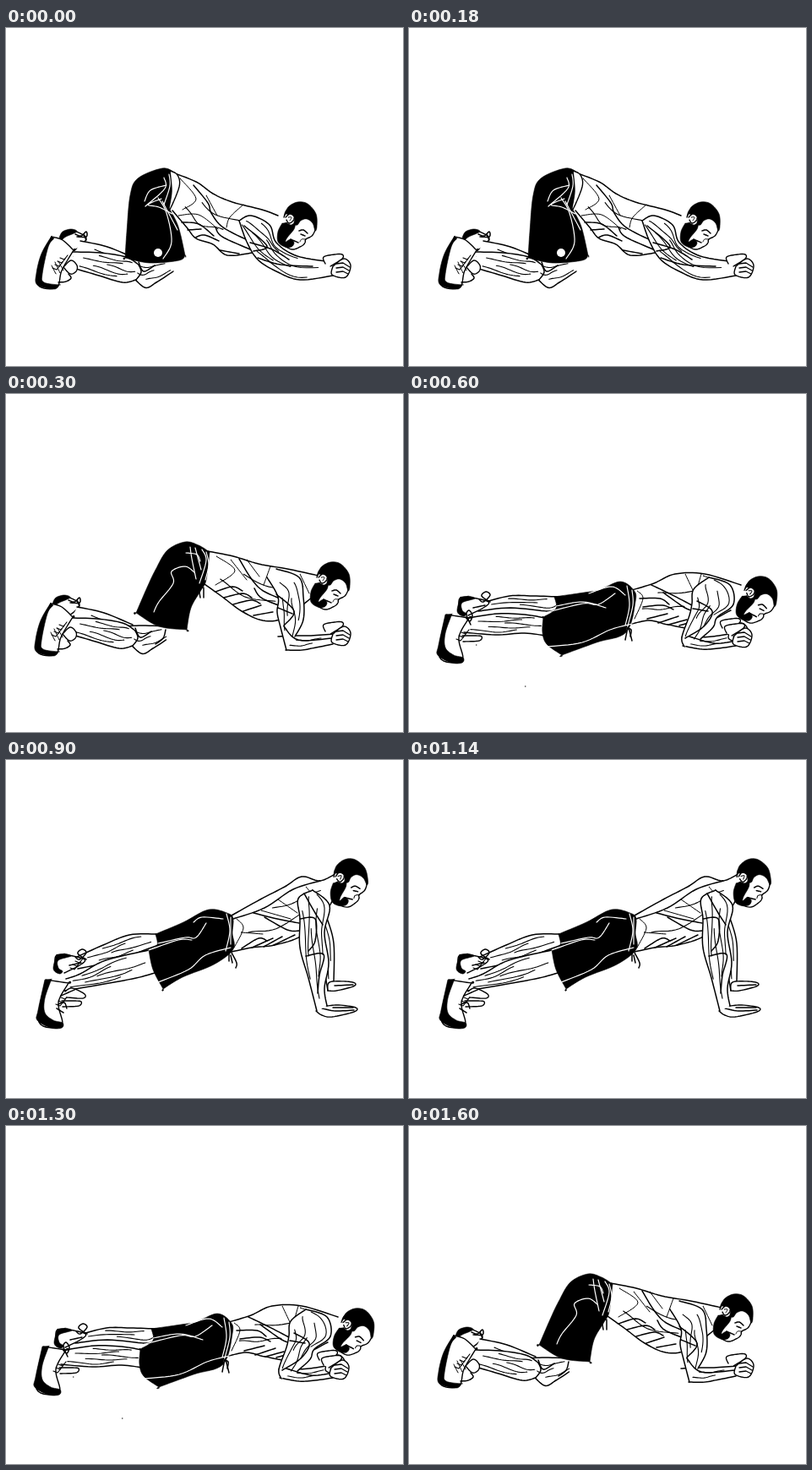
Write an HTML page with a canvas that moves like this. It is 470 by 400 pixels and loops after 1900 ms.

```html
<!DOCTYPE html>
<html lang="en">
<head>
<meta charset="utf-8">
<title>Plank push-up</title>
<style>
html, body { margin: 0; width: 100%; height: 100%; overflow: hidden; background: #fff; }
canvas { display: block; }
</style>
</head>
<body>
<canvas id="stage" width="470" height="400"></canvas>
<script>
const ctx = document.getElementById("stage").getContext("2d");
ctx.lineCap = ctx.lineJoin = "round";

const points = text => text.split(" ").map(q => q.split(",").map(Number));

// Position on the smooth curve through p, with u from 0 to 1
function spot(p, u) {
  const k = u * (p.length - 1), i = Math.min(Math.floor(k), p.length - 2), t = k - i;
  const b = p[i], c = p[i + 1], a = p[i - 1] || b, e = p[i + 2] || c;
  return b.map((v, j) => v + t / 2 * (c[j] - a[j]
    + t * (2 * a[j] - 5 * v + 4 * c[j] - e[j] + t * (3 * v - a[j] - 3 * c[j] + e[j]))));
}

function sample(p) {
  const n = (p.length - 1) * 8;
  return Array.from({ length: n + 1 }, (_, i) => spot(p, i / n));
}

function paint(list, stroke, width, fill) {
  ctx.beginPath();
  list.forEach(q => ctx.lineTo(...q));
  if (fill) { ctx.fillStyle = fill; ctx.fill(); }
  ctx.strokeStyle = stroke;
  ctx.lineWidth = width;
  ctx.stroke();
}

const strokes = (text, colour, width) =>
  text.split(" | ").forEach(s => paint(sample(points(s)), colour, width));
const line = text => strokes(text, "#000", 1.5);
const thin = text => strokes(text, "#000", 1);
const chalk = text => strokes(text, "#fff", 1.2);
const shape = text => paint(sample(points(text)), "#000", 1.4, "#fff");
const ink = text => paint(sample(points(text)), "#000", .6, "#000");

// White body part between two contours, with n staggered muscle lines
function muscle(top, bottom, n) {
  const a = points(top), b = points(bottom);
  const up = sample(a), down = sample(b);
  paint([...up, ...[...down].reverse()], "transparent", 1, "#fff");
  paint(up, "#000", 1.5);
  paint(down, "#000", 1.5);
  for (let i = 1; i <= n; i++) {
    const from = .04 + .45 * (i * .62 % 1);
    const fibre = Array.from({ length: 17 }, (_, k) => {
      const u = from + k / 16 * .48, f = i / (n + 1) + .05 * Math.sin(u * 11 + i * 2);
      const q = spot(b, u);
      return spot(a, u).map((v, j) => v + (q[j] - v) * f);
    });
    paint(fibre, "#000", 1.1);
  }
}

function placed(x, y, angle, part) {
  ctx.save();
  ctx.translate(x, y);
  ctx.rotate(angle * Math.PI / 180);
  part();
  ctx.restore();
}

function laces(x, y, n) {
  for (let i = 0; i < n; i++) {
    const cx = x + i * 3, cy = y - i * 4;
    paint([[cx, cy], [cx + 5, cy + 2], [cx + 9, cy - 3]], "#000", 1.2);
  }
}

function badge(x, y) {
  ctx.fillStyle = "#fff";
  ctx.beginPath();
  ctx.arc(x, y, 5, 0, 7);
  ctx.fill();
}

// Head around the ear
function head() {
  shape("-8,0 -4,-9 9,-12 24,-4 30,9 26,21 18,26 17,30 13,34 2,38 -9,32 -14,21");
  ink("-7,-2 -3,-12 8,-18 20,-16 30,-4 31,11 29,16 26,7 19,2 12,4 8,9 4,8 4,0 -5,-4");
  ink("-5,6 0,9 5,7 4,14 -4,24 -6,29 0,26 4,30 1,35 -7,35 -15,29 -15,17 -10,7");
  shape("-6,0 -1,-4 4,-1 3,4 -2,7 -5,3");
  line("10,16 15,15 20,19 | 12,20 17,22 | 0,26 9,30");
  thin("18,26 13,26 11,29 | -3,0 1,0 -1,4");
}

function kneelFarShoe() {
  shape("64,248 70,241 80,240 95,249 79,263 64,248");
  ink("63,248 67,241 77,238 84,241 71,247 66,251");
  line("82,244 89,246 95,241 95,247 84,247 | 92,244 95,251");
}

function kneelShoe() {
  shape("54,247 42,274 38,304 60,307 66,287 80,263 80,263 67,251 54,247");
  ink("54,246 42,267 36,290 37,304 57,309 63,304 63,304 45,301 43,291 50,259 57,249");
  shape("68,283 77,275 84,281 83,288 76,291 68,283");
  line("62,301 71,300 77,296 74,291");
  laces(55, 284, 4);
  thin("59,291 54,281 | 64,290 58,277 | 68,287 62,276");
}

function kneelLegs() {
  muscle("88,252 120,259 154,273", "80,270 115,281 154,282", 2);
  muscle("142,275 165,274 201,275", "146,290 164,307 178,301 198,288", 3);
  muscle("78,265 112,266 142,271 157,280", "83,285 110,293 138,301 154,298", 5);
  line("157,280 160,289 154,298 | 157,277 163,288 176,281");
}

function fists() {
  shape("378,281 376,273 389,270 398,270 398,275 384,284");
  shape("387,284 400,275 408,283 402,297 386,294 387,284");
  for (let i = 0; i < 3; i++)
    paint([[391, 281 + i * 5], [399, 280 + i * 5], [407 - i, 285 + i * 4]], "#000", 1.3);
}

function toeFarShoe() {
  shape("60,257 60,242 74,241 94,246 88,253 70,262");
  ink("61,240 57,257 64,263 68,260 63,256 63,247 78,242 70,239");
  line("83,243 88,246 96,238 91,234 86,239 96,246 | 76,253 90,250");
}

function toeShoe() {
  shape("44,261 71,265 71,265 59,288 63,315 36,311 44,261");
  ink("43,261 35,297 34,309 50,318 63,318 64,312 53,309 43,300 43,283 51,260");
  shape("63,286 78,286 86,287 83,292 64,293");
  laces(56, 290, 3);
}

function kneeling() {
  kneelFarShoe();
  kneelLegs();
  kneelShoe();
  muscle("194,170 225,182 245,196 268,206 303,215 322,222",
    "197,216 214,236 225,249 245,256 262,269 292,266", 2);
  line("222,186 239,207 243,219 257,236 288,252 | 208,230 228,232 246,246");
  line("224,248 235,245 252,252 | 215,239 231,238 | 248,236 256,247 289,262 | 253,263 276,267");
  thin("206,178 225,202 209,215 | 204,222 228,221 251,238 | 237,198 250,222 | 281,209 265,224 261,236");
  ink("200,171 185,166 156,178 147,198 143,241 141,272 141,272 170,278 205,275 212,269 212,269 204,235 193,213 193,213 199,195 200,171");
  shape("194,169 203,174 205,188 193,216 196,193 194,169");
  chalk("193,173 194,187 187,209 | 187,177 188,190 165,211 | 190,186 171,192 164,205");
  chalk("184,202 168,209 181,212 197,220 | 180,201 190,219 196,253 186,273 | 185,205 203,239");
  badge(180, 266);
  placed(337, 224, 0, head);
  muscle("276,228 290,222 312,233 320,254 345,270 386,277",
    "276,228 285,253 298,274 320,288 348,298 387,293", 6);
  line("282,234 309,258 293,264 | 298,272 325,280 363,282 | 289,254 315,262 335,274");
  placed(0, -2, 0, fists);
}

function leaning() {
  placed(-8, 0, 0, kneelFarShoe);
  placed(-4, 0, 0, kneelLegs);
  // Clear what the knee of the deeper pose would show beyond the hem
  ctx.clearRect(190, 268, 20, 40);
  placed(-1, 1, 0, kneelShoe);
  line("189,279 186,289 177,296");
  muscle("239,186 269,192 299,201 333,207 361,213 370,215",
    "235,225 256,240 279,257 304,268 329,265 362,241", 2);
  line("276,195 290,218 303,232 324,242 | 248,234 268,228 280,233 | 258,241 280,236 291,241");
  line("269,249 290,244 301,248 | 281,257 302,250 | 294,230 302,241 325,251 | 293,262 316,258");
  thin("249,192 271,209 248,226 | 266,196 285,220 | 285,196 300,216 | 313,204 305,226 | 348,213 359,236");
  ink("241,187 228,179 212,175 191,185 177,208 167,229 154,259 154,259 181,275 214,279 214,279 219,253 231,232 237,220 241,187");
  chalk("232,184 237,197 229,224 | 237,187 240,202 236,220 | 218,181 220,195 225,219 | 224,182 231,208");
  chalk("223,211 212,204 196,210 198,224 181,246 175,258 | 230,198 226,190 213,188");
  line("234,229 229,231 230,241 | 234,230 234,241");
  placed(376, 217, 0, head);
  muscle("322,287 342,286 361,286 387,284", "331,303 350,303 367,300 387,296", 2);
  muscle("309,217 322,240 321,258 325,276 332,303",
    "320,207 347,217 352,240 352,267 342,287", 4);
  line("320,237 341,257 329,274 | 322,253 339,260 | 329,275 346,291 386,289");
  fists();
}

function lowPlank() {
  muscle("87,247 119,239 147,239 178,240", "82,257 120,253 166,257 178,252", 3);
  toeFarShoe();
  muscle("70,265 105,260 137,261 161,265", "65,282 102,285 137,283 161,286", 5);
  toeShoe();
  line("67,264 72,269 75,262 71,256 68,261 73,273");
  thin("79,297 80,297 | 137,346 138,346");
  muscle("264,232 290,224 315,213 350,213 393,226",
    "264,272 285,268 307,273 339,276 381,256", 2);
  line("287,226 310,237 335,250 | 301,235 325,252 337,257 | 282,266 306,260 | 295,271 319,263 | 307,273 329,267");
  line("273,242 297,242 308,249 | 277,252 300,250 313,255 | 320,274 338,269");
  thin("270,233 277,242 267,266 | 327,213 336,232 | 346,213 340,234 | 348,215 377,225");
  ink("172,240 207,235 225,232 250,222 266,232 268,246 257,282 222,294 181,309 181,309 163,296 158,282 159,264 159,264 174,254 172,240");
  chalk("174,251 206,246 233,253 | 161,259 206,248 224,249 244,236 | 213,236 240,228 256,238");
  chalk("164,299 205,294 238,279 264,272 | 258,227 261,250 256,274 | 264,232 265,250 258,278");
  line("259,276 256,291 | 260,276 264,292 | 257,277 263,279 262,287");
  placed(405, 233, 5, head);
  muscle("323,288 345,288 367,286 388,282", "324,298 347,302 366,301 387,298", 2);
  placed(-7, -4, 0, fists);
  muscle("355,217 337,231 335,248 332,262 323,288 326,299",
    "355,217 380,226 384,249 365,264 360,276 345,290", 5);
  line("341,245 359,257 349,275 327,289 | 336,254 354,257 | 332,287 362,295 387,292");
  placed(-2, 2, 0, fists);
}

function highPlank() {
  muscle("84,233 115,219 146,207 178,206", "85,247 119,240 142,233 180,219", 4);
  placed(-1, -10, 0, toeFarShoe);
  laces(76, 246, 3);
  muscle("71,259 88,253 118,237 169,225", "69,273 111,266 154,258 176,252", 5);
  placed(3, -1, 0, toeShoe);
  shape("70,274 78,270 93,277 91,282 72,281");
  line("65,279 81,272 | 62,289 69,287 72,294 | 60,294 68,299");
  muscle("267,184 301,165 330,150 350,138 371,143 388,136",
    "267,227 291,222 318,219 350,208 376,183 390,160", 2);
  line("269,188 306,175 340,153 372,143 | 293,181 321,188 347,193 | 306,186 333,201 348,202");
  line("279,223 299,211 309,214 | 291,222 316,211 | 305,221 327,209 | 317,219 342,207");
  thin("273,188 281,199 270,222 | 302,178 337,188 | 322,165 345,181 | 355,150 373,171 | 278,204 304,206");
  ink("177,206 210,192 240,177 264,182 269,189 268,205 269,224 246,242 209,257 186,271 186,271 174,248 169,225 169,225 179,219 177,206");
  chalk("180,217 212,210 225,210 237,193 | 222,192 232,186 257,188 | 169,225 204,213 220,213");
  chalk("180,263 216,248 236,231 266,222 | 261,182 265,202 260,226 | 266,186 266,218");
  line("264,229 264,238 | 267,228 273,240 272,246 | 266,231 268,240");
  placed(396, 137, -10, head);
  muscle("371,191 376,241 381,273", "380,187 388,217 388,263", 2);
  shape("381,273 383,263 402,262 413,264 411,268 391,273 381,273");
  line("389,267 411,266");
  shape("367,292 380,291 394,290 414,293 412,298 386,304 374,302 367,297");
  line("387,293 411,293 | 374,294 390,297 412,296");
  muscle("363,154 346,164 348,188 348,222 358,258 368,297",
    "363,154 383,172 377,204 382,240 377,270 380,291", 5);
  line("348,188 366,188 366,214 358,226 | 355,232 376,230 371,255 369,276 | 353,158 366,181 375,195");
}

const poses = [kneeling, leaning, lowPlank, highPlank, lowPlank, leaning];
const ends = [300, 600, 900, 1300, 1600, 1900];
const start = performance.now();
let shown;

function frame() {
  const t = (performance.now() - start) % 1900;
  const pose = poses[ends.findIndex(end => t < end)];
  if (pose !== shown) {
    ctx.clearRect(0, 0, 470, 400);
    pose();
    shown = pose;
  }
  requestAnimationFrame(frame);
}
frame();
</script>
</body>
</html>
```
